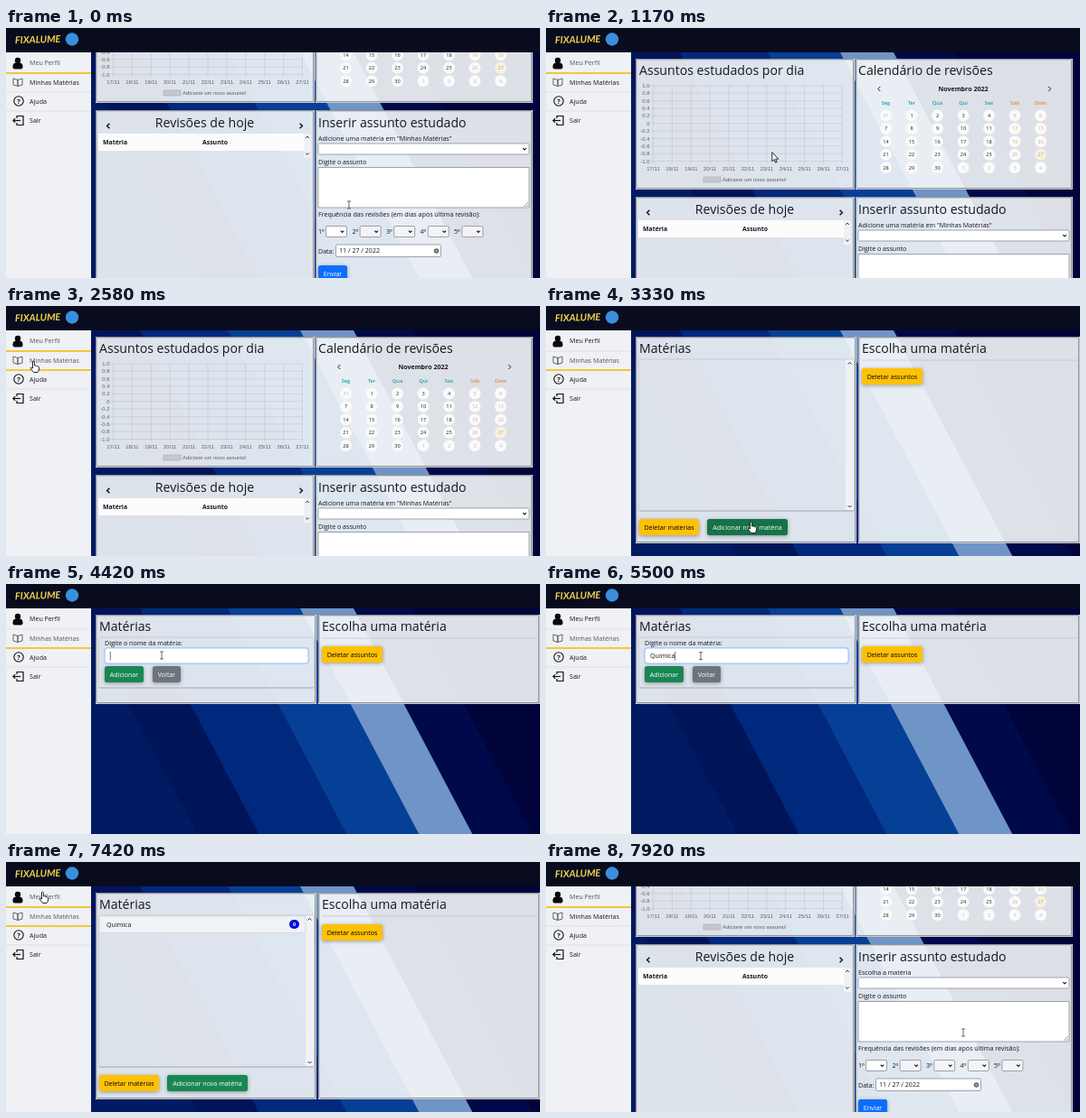
Animation, 590 px wide and 277 px high, one loop 8000 ms. Source, as an HTML page with a canvas:

```html
<!DOCTYPE html>
<html lang="pt">
<head>
<meta charset="utf-8">
<title>Fixalume</title>
<style>
html, body { margin: 0; width: 100%; height: 100%; overflow: hidden; background: #00145a; }
canvas { display: block; width: 590px; height: 277px; }
</style>
</head>
<body>
<canvas id="stage"></canvas>
<script>
const W = 590, H = 277, LOOP = 8000;
const canvas = document.getElementById('stage');
const ratio = window.devicePixelRatio || 1;
canvas.width = W * ratio;
canvas.height = H * ratio;
const ctx = canvas.getContext('2d');

const SANS = '"Open Sans", "Noto Sans", sans-serif';
const ARIAL = '"Liberation Sans", sans-serif';
const INK = '#16181c', YELLOW = '#f5c73a';

// Moments at which the page changes
const OPEN_SUBJECTS = 2600, OPEN_FORM = 3420, FOCUS = 4050, TYPE = 4600,
      ADD = 6080, BACK = 6640, OPEN_PROFILE = 7500;

// Pointer path: time, x, y
const pointerPath = [
  [0, 379, 196], [500, 372, 190], [950, 330, 165], [1600, 31, 63], [2600, 31, 63],
  [3220, 227, 241], [3450, 227, 241], [4000, 172, 79], [5450, 172, 79],
  [5900, 144, 99], [6380, 144, 99], [6560, 178, 98], [6680, 178, 98],
  [7300, 41, 35], [7520, 41, 35], [7880, 461, 189], [LOOP, 461, 189]
];

let mouse, cursorKind;

function ease(t, from, to) {
  const p = Math.min(1, Math.max(0, (t - from) / (to - from)));
  return p * p * (3 - 2 * p);
}

function pointerAt(t) {
  const i = pointerPath.findIndex(k => k[0] > t);
  const [t0, x0, y0] = pointerPath[i - 1], [t1, x1, y1] = pointerPath[i];
  const p = ease(t, t0, t1);
  return { x: x0 + (x1 - x0) * p, y: y0 + (y1 - y0) * p };
}

// y is the vertical middle of the capitals
function text(s, x, y, size = 7.1, color = INK, { weight = 400, align = 'left', family = SANS } = {}) {
  ctx.font = `${weight} ${size}px ${family}`;
  ctx.textAlign = align;
  ctx.fillStyle = color;
  ctx.fillText(s, x, y + size * 0.35);
}

const heading = (s, x, y, align) => text(s, x, y, 14.1, INK, { align });

function box(x, y, w, h, fill, stroke, radius = 0) {
  ctx.beginPath();
  ctx.roundRect(x, y, w, h, radius);
  if (fill) { ctx.fillStyle = fill; ctx.fill(); }
  if (stroke) { ctx.strokeStyle = stroke; ctx.lineWidth = 0.8; ctx.stroke(); }
}

function line(points, color = INK, width = 1) {
  ctx.beginPath();
  points.forEach(([x, y]) => ctx.lineTo(x, y));
  ctx.strokeStyle = color;
  ctx.lineWidth = width;
  ctx.stroke();
}

function disc(x, y, r, fill, stroke, width = 1) {
  ctx.beginPath();
  ctx.arc(x, y, r, 0, Math.PI * 2);
  if (fill) { ctx.fillStyle = fill; ctx.fill(); }
  if (stroke) { ctx.strokeStyle = stroke; ctx.lineWidth = width; ctx.stroke(); }
}

// An open arrow head; (dx, dy) is the direction it points to
function chevron(x, y, dx, dy, r = 2.5, width = 1, color = INK) {
  const a = r / 2;
  line([[x - dx * a - dy * r, y - dy * a - dx * r], [x + dx * a, y + dy * a],
        [x - dx * a + dy * r, y - dy * a + dx * r]], color, width);
}

function hover(x, y, w, h, kind) {
  const inside = mouse.x >= x && mouse.x < x + w && mouse.y >= y && mouse.y < y + h;
  if (inside) cursorKind = kind;
  return inside;
}

function button(label, x, y, w, color, hoverColor, ink = '#fff') {
  const over = hover(x, y, w, 18, 'hand');
  ctx.save();
  ctx.shadowColor = 'rgba(0,0,0,.35)';
  ctx.shadowBlur = 4 * ratio;
  ctx.shadowOffsetY = ratio;
  box(x, y, w, 18, over ? hoverColor : color, null, 2.5);
  ctx.restore();
  text(label, x + w / 2, y + 9.5, 7.1, ink, { align: 'center' });
}

// A translucent card with a grooved border
function panel(x, y, right, bottom) {
  const w = right - x, h = bottom - y;
  box(x, y, w, h, 'rgba(246,249,250,.9)');
  box(x + 0.5, y + 0.5, w - 2, h - 2, null, '#7d8087');
  box(x + 1.5, y + 1.5, w - 2, h - 2, null, '#c3c5ca');
}

function drawBackground() {
  const bands = [[-120, '#001b62'], [80, '#00145a'], [148, '#00287c'],
                 [245, '#063f96'], [325, '#6f94c6'], [384, '#000a4a'], [450, '#00043a']];
  const shift = (H - 27) * 0.525;
  for (const [x, color] of bands) {
    ctx.beginPath();
    ctx.moveTo(x, 27);
    ctx.lineTo(W + 200, 27);
    ctx.lineTo(W + 200, H);
    ctx.lineTo(x + shift, H);
    ctx.fillStyle = color;
    ctx.fill();
  }
}

function drawChart() {
  const left = 118.5, top = 64, stepX = 20.9, stepY = 8.35, gray = '#5e5e5e';
  const grid = 'rgba(0,0,0,.1)';
  heading('Assuntos estudados por dia', 103, 47.5);
  for (let i = 0; i <= 10; i++) {
    const x = left + i * stepX, y = top + i * stepY;
    line([[x, top], [x, top + 10 * stepY + 3]], grid, 0.8);
    line([[left - 3, y], [left + 10 * stepX, y]], grid, 0.8);
    text(i === 5 ? '0' : (1 - i / 5).toFixed(1), left - 4, y, 5.9, gray, { align: 'right', family: ARIAL });
    text(`${17 + i}/11`, x, 155.5, 5.9, gray, { align: 'center', family: ARIAL });
  }
  box(174, 165, 19, 6, '#c6c7cc', '#b2b3b8');
  text('Adicione um novo assunto!', 195, 168, 5.9, gray, { family: ARIAL });
}

function drawCalendar() {
  heading('Calendário de revisões', 345, 47.5);
  text('Novembro 2022', 461, 68, 7.1, INK, { weight: 700, align: 'center' });
  chevron(368, 67.5, -1, 0);
  chevron(556.5, 67.5, 1, 0);
  ['Seg', 'Ter', 'Qua', 'Qui', 'Sex', 'Sáb', 'Dom'].forEach((name, i) =>
    text(name, 375.5 + i * 28.5, 83, 5.7, i < 5 ? '#1f9db0' : '#e08a3c', { weight: 600, align: 'center' }));
  for (let i = 0; i < 35; i++) {
    const col = i % 7, x = 375.5 + col * 28.5, y = 97 + Math.floor(i / 7) * 14.4;
    const day = i === 0 ? 31 : (i - 1) % 30 + 1;
    const outside = i === 0 || i > 30, today = i === 27;
    const color = outside ? '#b9b9b9' : today ? '#e8a020' : col > 4 ? '#d9a878' : '#222';
    disc(x, y, 6.4, today ? '#f5f1e8' : '#fafafb');
    text(String(day), x, y, 5.6, color, { align: 'center' });
  }
}

function drawReviews() {
  heading('Revisões de hoje', 219.5, 201, 'center');
  chevron(113, 204.5, -1, 0, 2.8, 1.5);
  chevron(326, 204.5, 1, 0, 2.8, 1.5);
  box(102, 213, 227, 19, '#fcfcfd');
  box(329, 213, 8, 27, '#f1f1f4');
  text('Matéria', 107, 223, 6.9, INK, { weight: 700 });
  text('Assunto', 217, 223, 6.9, INK, { weight: 700 });
  chevron(333, 217, 0, -1, 1.8, 0.9);
  chevron(333, 235.5, 0, 1, 1.8, 0.9);
}

function selectField(x, y, w, fill = '#fff') {
  box(x, y, w, 12, fill, '#8b8d96', 1.5);
  chevron(x + w - 5, y + 6, 0, 1, 1.8, 1.1);
}

function drawStudyForm(hasSubject, scroll) {
  heading('Inserir assunto estudado', 345, 201);
  text(hasSubject ? 'Escolha a matéria' : 'Adicione uma matéria em "Minhas Matérias"', 345, 218.5);
  selectField(345, 224, 233);
  text('Digite o assunto', 345, 245);
  box(345, 250.5, 233, 44.5, '#fff', '#8b8d96');
  hover(345, 250 - scroll, 233, 45, 'text');
  line([[572, 294], [577, 289]], '#777', 0.7);
  line([[575, 294], [577, 292]], '#777', 0.7);
  text('Frequência das revisões (em dias após última revisão):', 345, 303);
  for (let i = 0; i < 5; i++) {
    text(`${i + 1}º`, 345 + i * 37.5, 321.5);
    selectField(353.5 + i * 37.6, 315.5, 23, i ? '#f4f4f7' : '#fff');
  }
  text('Data:', 345, 343.5);
  box(364.5, 336, 116, 13.5, '#fff', '#8b8d96', 1.5);
  text('11 / 27 / 2022', 368, 343);
  disc(475.5, 343, 2.8, '#666');
  line([[474.4, 341.9], [476.6, 344.1]], '#fff', 0.6);
  line([[476.6, 341.9], [474.4, 344.1]], '#fff', 0.6);
  button('Enviar', 345, 359, 32, '#0d6efd', '#0d6efd');
}

function drawDashboard(scroll, hasSubject) {
  ctx.save();
  ctx.translate(0, -scroll);
  panel(99, 34, 341, 179);
  panel(342, 34, 582, 179);
  panel(99, 187, 341, 400);
  panel(342, 187, 582, 400);
  drawChart();
  drawCalendar();
  drawReviews();
  drawStudyForm(hasSubject, scroll);
  ctx.restore();
}

function drawSubjectPanels(bottom) {
  panel(99, 34, 343, bottom);
  panel(345, 34, 590, bottom);
  heading('Matérias', 103, 47.5);
  heading('Escolha uma matéria', 349, 47.5);
  line([[103, 59], [340, 59]], '#c3c5cb', 0.8);
  line([[349, 60], [587, 60]], '#c3c5cb', 0.8);
  button('Deletar assuntos', 349, 69, 67, '#ffc107', '#e6ad06', '#000');
}

// The lower and side edges of the box around the subjects
function drawTrayEdge(bottom) {
  line([[102.5, 60], [102.5, bottom], [340.5, bottom], [340.5, 60]], '#c9cbd1', 0.7);
  line([[103, bottom + 0.7], [340, bottom + 0.7]], '#a7a9b0', 0.8);
}

function drawSubjectList(hasSubject) {
  drawSubjectPanels(263);
  box(331, 59.5, 9, 167, '#f1f2f5');
  chevron(335.5, 63.5, 0, -1, 2, 0.9);
  chevron(335.5, 222, 0, 1, 2, 0.9);
  drawTrayEdge(226.5);
  if (hasSubject) {
    box(103, 60, 228, 18.5, '#f1f2f6', '#d3d5db');
    text('Química', 111, 70);
    box(313, 64, 11, 10, '#0808dd', null, 5);
    text('0', 318.5, 69, 5.4, '#fff', { weight: 700, align: 'center' });
  }
  button('Deletar matérias', 103, 236, 66, '#ffc107', '#e6ad06', '#000');
  button('Adicionar nova matéria', 178, 236, 89, '#198754', '#157347');
}

function drawSubjectForm(t) {
  const added = t >= ADD, focused = t >= FOCUS && !added;
  const typed = 'Química'.slice(0, Math.max(0, Math.floor((t - TYPE) / 110)));
  drawSubjectPanels(added ? 167 : 133);
  text('Digite o nome da matéria:', 109, 66);
  if (focused) box(108, 70, 227, 19, '#c3d9f5', null, 4);
  box(109, 71, 225, 17, '#fff', focused ? '#86b7fe' : '#ced4da', 3);
  hover(109, 71, 225, 17, 'text');
  text(typed, 115, 80);
  if (focused && Math.floor(t / 530) % 2 === 0) {
    const x = 115.3 + ctx.measureText(typed).width;
    line([[x, 75], [x, 84.5]], '#333', 0.7);
  }
  button('Adicionar', 109, 91, 43, '#198754', '#157347');
  button('Voltar', 162, 91, 31, '#6c757d', '#5c636a');
  if (added) {
    box(109, 113.5, 225, 26.5, '#cfe3d8', '#b9d6c7', 3);
    text('Matéria "Química" adicionada com sucesso!', 117, 127.5, 7.1, '#0f5132');
  }
  drawTrayEdge(added ? 148.5 : 114.5);
}

const icons = [
  () => {
    disc(13, 36, 3.2, '#080808');
    box(7.5, 38.5, 11, 7, '#080808', null, [4, 4, 2, 2]);
  },
  () => {
    for (const side of [-1, 1])
      line([[13, 57.5], [13 + side * 5, 56], [13 + side * 5, 63], [13, 64.5], [13, 57.5]], '#555', 0.9);
  },
  () => {
    disc(14, 81, 5.2, null, '#111', 1.1);
    text('?', 14, 81, 7.5, '#111', { weight: 700, align: 'center' });
  },
  () => {
    line([[12, 100], [12, 97.5], [19, 97.5], [19, 107.5], [12, 107.5], [12, 105]], '#111', 1.2);
    line([[8, 102.5], [16, 102.5]], '#111', 1.2);
    chevron(9, 102.5, -1, 0, 2.3, 1.2, '#111');
  }
];

function drawSidebar(active) {
  box(0, 27, 94, H - 27, '#f0f1f5');
  ['Meu Perfil', 'Minhas Matérias', 'Ajuda', 'Sair'].forEach((label, i) => {
    const y = 39 + i * 21.1, bottom = 50 + i * 21;
    const over = hover(0, bottom - 21, 94, 21, 'hand');
    const lit = over || i === active;
    text(label, 26, y, 7.1, lit ? '#50555c' : INK);
    if (i < 3) line([[0, bottom], [94, bottom]], lit ? YELLOW : '#d9dbe1', lit ? 2 : 0.8);
    icons[i]();
  });
}

function drawHeader() {
  box(0, 0, W, 27, '#080c1e');
  ctx.save();
  ctx.translate(10, 13.5);
  ctx.rotate(-0.03);
  text('FIXALUME', 0, 0, 10.8, '#f3d64b', { weight: 'italic 700', family: 'Lato, sans-serif' });
  ctx.restore();
  disc(73, 12.5, 7.2, '#3a8fdc');
}

const handShape = new Path2D('M0 0C1-.8 2 0 2 1V4.5C3 4 3.7 4.3 3.9 5C4.8 4.6 5.5 5 5.6 5.6' +
  'C6.6 5.4 7 6 7 6.8V8.5C7 10 6 11 5.5 12H1C0 10.5-1.5 9-2.5 7.5C-2.5 6.5-1 6.5 0 7.5Z');
const arrowShape = new Path2D('M0 0V10L2.3 8L3.8 11.5L5.3 10.8L3.8 7.5H7Z');

function drawCursor() {
  const { x, y } = mouse;
  if (cursorKind === 'text') {
    line([[x, y - 4], [x, y + 4]], '#444', 0.8);
    for (const end of [-4, 4]) line([[x - 2, y + end], [x + 2, y + end]], '#444', 0.8);
    return;
  }
  const hand = cursorKind === 'hand', shape = hand ? handShape : arrowShape;
  ctx.save();
  ctx.translate(x, y);
  if (hand) ctx.translate(-1.5, -1.5);
  ctx.fillStyle = '#fff';
  ctx.strokeStyle = '#111';
  ctx.lineWidth = 0.9;
  ctx.fill(shape);
  ctx.stroke(shape);
  ctx.restore();
}

function draw(t) {
  ctx.setTransform(ratio, 0, 0, ratio, 0, 0);
  mouse = pointerAt(t);
  cursorKind = 'arrow';
  const dashboard = t < OPEN_SUBJECTS || t >= OPEN_PROFILE;
  const hasSubject = t >= ADD;

  drawBackground();
  if (dashboard) {
    const scroll = 96 * (1 - ease(t, 650, 950) + ease(t, 7600, 7840));
    drawDashboard(scroll, hasSubject);
  } else if (t >= OPEN_FORM && t < BACK) {
    drawSubjectForm(t);
  } else {
    drawSubjectList(hasSubject);
  }
  drawSidebar(dashboard ? 0 : 1);
  drawHeader();
  drawCursor();
}

function tick() {
  draw(performance.now() % LOOP);
  requestAnimationFrame(tick);
}
tick();
</script>
</body>
</html>
```
